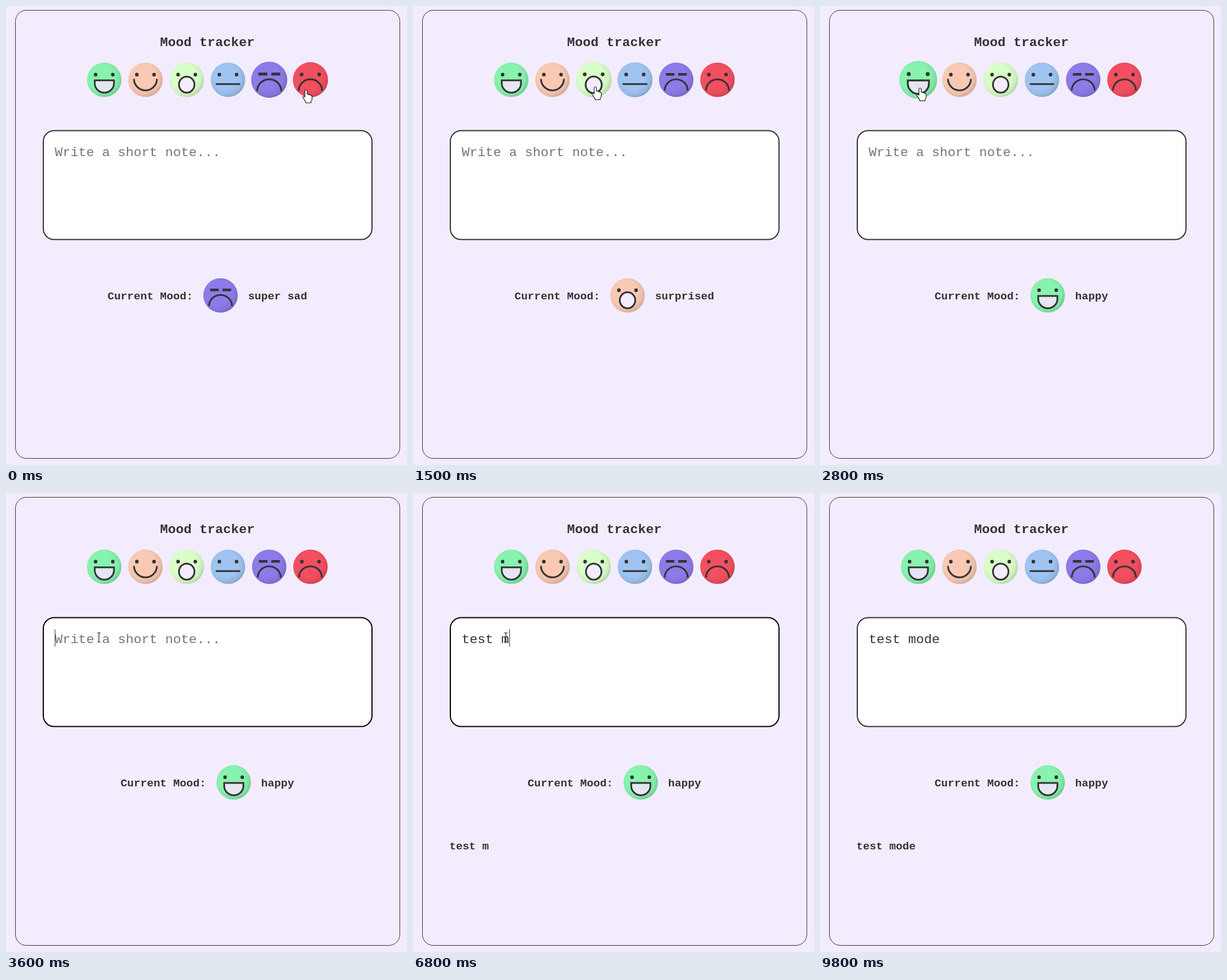
Recreate the animation shown at these times as an HTML page. Size 699 by 801 pixels, loop 9.9 s.

```html
<!DOCTYPE html>
<html lang="en">
<head>
<meta charset="utf-8">
<title>Mood tracker</title>
<style>
  html, body { margin: 0; width: 100%; height: 100%; overflow: hidden; background: #f3ecff; }
  svg { display: block; }
  text { font: 22.92px "Liberation Mono", "Noto Sans Mono", monospace; fill: #333; white-space: pre; }
  .bold { font-weight: bold; }
  .small { font-size: 19.1px; }
  .line { fill: none; stroke: #333; stroke-width: 3; }
</style>
</head>
<body>
<svg width="699" height="801" viewBox="0 0 699 801">
  <defs>
    <radialGradient id="shade" cx=".42" cy=".42" r=".6">
      <stop offset=".6" stop-opacity="0"/>
      <stop offset=".85" stop-opacity=".06"/>
      <stop offset="1" stop-opacity=".16"/>
    </radialGradient>
  </defs>
  <rect width="699" height="801" fill="#f3ecff"/>
  <rect x="16.5" y="7.5" width="670" height="782" rx="19" fill="none" stroke="#333"/>
  <text class="bold" x="351" y="69.5" text-anchor="middle">Mood tracker</text>
  <g id="scene"></g>
</svg>
<script>
const LOOP = 9900, STEP = 100, HOVER_MS = 250;
const BIG = 22.92 * 0.6, SMALL = 19.1 * 0.6;

const dots = '<ellipse cx="-15" cy="-9" rx="3.1" ry="3.2" fill="#333"/><ellipse cx="15" cy="-9" rx="3.1" ry="3.2" fill="#333"/>';
const dashes = '<path class="line" style="stroke-width:4.6" d="M-18-9.5h15M3.5-9.5h15"/>';
const smile = '<path class="line" d="M-20-1.5a20 20 0 0 0 40 0"/>';
const frown = '<path class="line" d="M-20 18.8a20 19.6 0 0 1 40 0"/>';
const grin = '<path class="line" style="fill:#e4e7f1" d="M-16.5 1h33.5v5a16.75 16.5 0 0 1-33.5 0z"/>';
const gasp = '<ellipse class="line" style="fill:#f3ecff" cy="8.5" rx="13.5" ry="14"/>';
const flat = '<path class="line" d="M-21.3 7.5h42.6"/>';

// shown: colour used beside "Current Mood"; hover: spans in ms
const moods = [
  { name: 'happy', color: '#87f3ae', features: dots + grin, hover: [[2560, 3080]] },
  { name: 'good', color: '#f9c9b3', shown: '#d9fec9', features: dots + smile, hover: [[1780, 2500]] },
  { name: 'surprised', color: '#d9fec9', shown: '#f9c9b3', features: dots + gasp, hover: [[1390, 1730]] },
  { name: 'neutral', color: '#9fc4f1', features: dots + flat, hover: [[830, 1320]] },
  { name: 'super sad', color: '#8d7be9', features: dashes + frown, hover: [[-500, -125], [650, 770]] },
  { name: 'angry', color: '#f24f61', features: dots + frown, hover: [[-72, 625]] },
];
const clicks = [[0, 4], [200, 5], [1000, 3], [1500, 2], [2000, 1], [2800, 0]];
const keys = [4500, 4700, 4900, 5100, 6400, 6700, 7100, 7500, 7800];
const note = 'test mode', focusAt = 3500, blurAt = 9200;
const path = [
  [0, 523, 147], [150, 526, 142], [500, 524, 142], [600, 512, 144], [800, 414, 149], [950, 390, 142],
  [1200, 387, 141], [1450, 319, 141], [1650, 314, 143], [1850, 258, 146], [2100, 253, 147],
  [2350, 248, 146], [2650, 177, 141], [2950, 172, 146], [3400, 162, 252], [8600, 162, 252], [9000, 540, 20],
];

const clamp = v => Math.max(0, Math.min(1, v));
const text = (x, y, str, cls = '', fill = '#333') =>
  `<text x="${x}" y="${y}" class="${cls}" style="fill:${fill}">${str}</text>`;

const face = (x, y, color, features, scale = 1) =>
  `<g transform="translate(${x} ${y}) scale(${scale})"><circle r="30" fill="${color}"/>` +
  `<circle r="30" fill="url(#shade)"/>${features}</g>`;

function hoverScale(mood, t) {
  const level = Math.max(...mood.hover.map(([from, to]) => {
    const peak = Math.min(HOVER_MS, to - from);
    return clamp(Math.min(t - from, peak, peak - (t - to)) / HOVER_MS);
  }));
  return 1 + 0.1 * level * level * (3 - 2 * level);
}

function currentMood(t) {
  const { name, color, shown = color, features } = moods[clicks.filter(c => c[0] <= t).pop()[1]];
  const left = 351 - (13 * SMALL + 96 + name.length * SMALL) / 2;
  const faceX = left + 13 * SMALL + 48;
  return text(left, 512, 'Current Mood:', 'bold small') +
    face(faceX, 505, shown, features) + text(faceX + 48, 512, name, 'bold small');
}

function noteBox(t) {
  const typed = note.slice(0, keys.filter(k => k <= t).length);
  const focused = t >= focusAt && t < blurAt;
  const lastInput = [focusAt, ...keys].filter(k => k <= t).pop();
  const caretX = Math.round(85 + typed.length * BIG) + 0.5;
  let out = `<rect x="65" y="217.5" width="573" height="190" rx="19" fill="#fff" stroke="${focused ? '#000' : '#333'}" stroke-width="2"/>`;
  out += typed ? text(85, 261.5, typed) : text(85, 261.5, 'Write a short note...', '', '#757575');
  if (focused && (t - lastInput) % 1000 < 500) out += `<path d="M${caretX} 238v30" stroke="#333"/>`;
  return out + text(63.5, 622, typed, 'bold small');
}

function pointer(t) {
  const i = path.findIndex(p => p[0] > t);
  if (i < 1) return '';
  const [[t0, x0, y0], [t1, x1, y1]] = [path[i - 1], path[i]];
  const k = (t - t0) / (t1 - t0), x = x0 + (x1 - x0) * k, y = y0 + (y1 - y0) * k;
  const onFace = moods.some(m => m.hover.some(([from, to]) => t >= from && t < to));
  let shape;
  if (y > 217) shape = '<path d="M-3-8h2l1 1 1-1h2M0-7v14M-3 8h2l1-1 1 1h2" fill="none" stroke="#222" stroke-width="1.2"/>';
  else if (onFace) shape = '<path d="M-2 1q2-3 4 0v6q2-1 3 1 2-1 3 1 2.5-.5 2.5 2v4q0 3-2 5v2h-9v-2q-2-2-3-4.500l-2.500-3.500q1-2.500 4 0z" fill="#fff" stroke="#111" stroke-width="1.1" stroke-linejoin="round"/>';
  else shape = '<path d="M0 0v15.500l3.500-3.300 2.600 6 2.400-1-2.600-5.800h5z" fill="#fff" stroke="#111"/>';
  return `<g transform="translate(${x} ${y})">${shape}</g>`;
}

const scene = document.getElementById('scene');
let shownTime = -1;
function draw() {
  const t = Math.floor(performance.now() % LOOP / STEP) * STEP;
  if (t !== shownTime) {
    shownTime = t;
    scene.innerHTML = moods.map((m, i) => face(171.2 + 71.9 * i, 128.7, m.color, m.features, hoverScale(m, t))).join('') +
      noteBox(t) + currentMood(t) + pointer(t);
  }
  requestAnimationFrame(draw);
}
draw();
</script>
</body>
</html>
```
